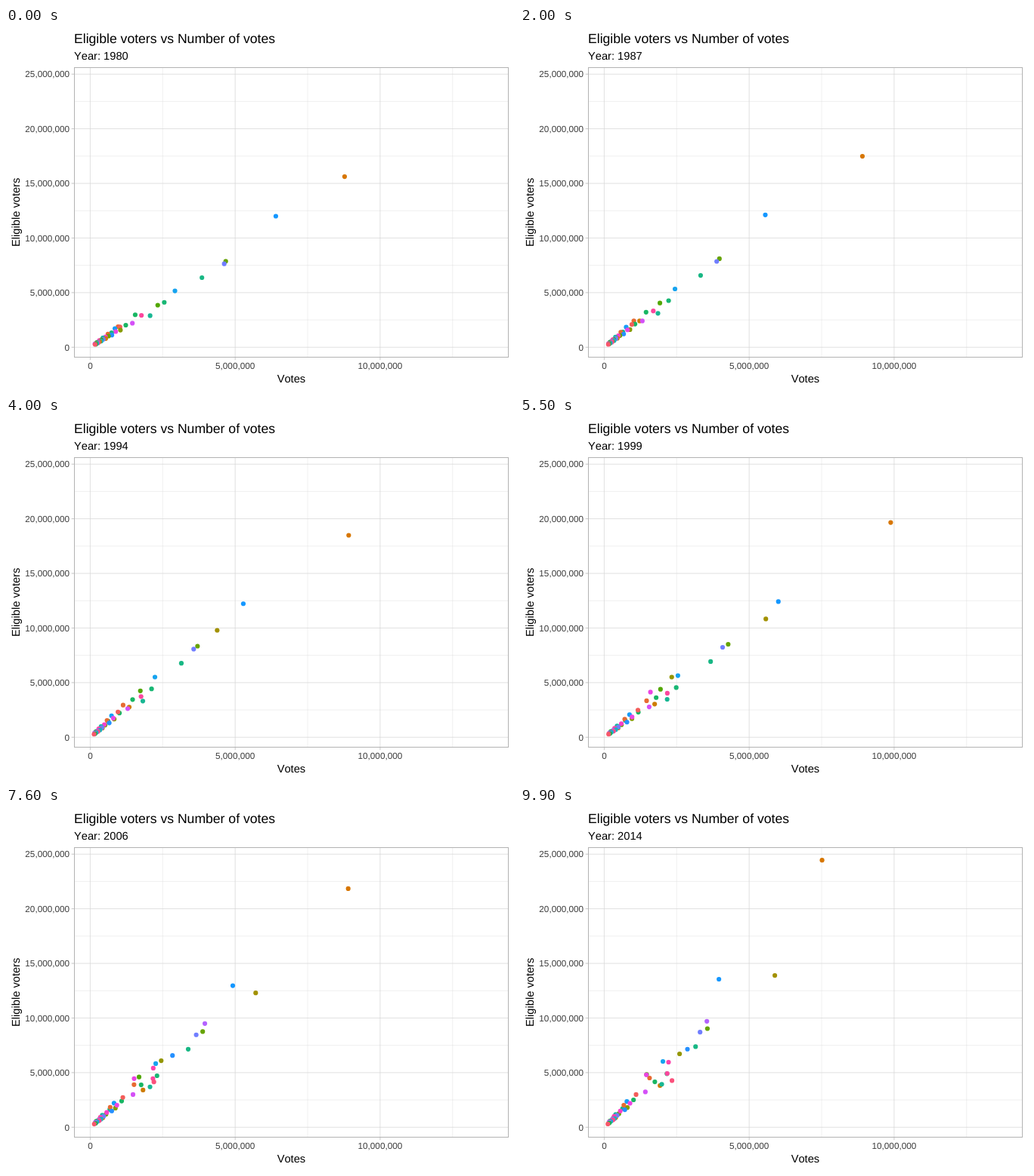
An HTML page that plays this animation: 672x480 px, repeating every 10000 ms.

```html
<!DOCTYPE html>
<html lang="en">
<head>
<meta charset="utf-8">
<title>Eligible voters vs Number of votes</title>
<style>
  html, body { margin: 0; width: 100%; height: 100%; overflow: hidden; background: #fff; }
  svg {
    display: block; font: 14.67px "Liberation Sans", Arial, sans-serif;
    font-kerning: none; text-rendering: geometricPrecision;
  }
  .title { font-size: 17.6px; }
  .tick { font-size: 11.73px; fill: #3c3c3c; }
  .mid { text-anchor: middle; }
  .end { text-anchor: end; }
  .major { stroke: #d6d6d6; stroke-width: .75; }
  .minor { stroke: #d6d6d6; stroke-width: .4; }
  .mark { stroke: #b3b3b3; stroke-width: .75; }
  .border { fill: none; stroke: #b3b3b3; stroke-width: 1; }
</style>
</head>
<body>
<svg width="672" height="480" viewBox="0 0 672 480">
  <text class="title" x="90" y="20">Eligible voters vs Number of votes</text>
  <text id="year" x="90" y="42"></text>
  <g id="axes"></g>
  <g id="dots"></g>
  <rect class="border" x="90.5" y="52.5" width="574" height="384"/>
  <text class="mid" x="377.4" y="470">Votes</text>
  <text class="mid" transform="translate(18 244.3) rotate(-90)">Eligible voters</text>
</svg>
<script>
const FRAMES = 100, LAST = FRAMES - 1, STEP = 100;
const xAt = millions => 111.4 + millions * 38.35;
const yAt = millions => 423.3 - millions * 14.484;

// Axes
const axes = document.getElementById("axes");
const add = markup => axes.insertAdjacentHTML("beforeend", markup);
const line = (cls, x1, y1, x2, y2) =>
  add(`<line class="${cls}" x1="${x1}" y1="${y1}" x2="${x2}" y2="${y2}"/>`);
const vertical = (cls, m) => line(cls, xAt(m), 52, xAt(m), 436.5);
const horizontal = (cls, m) => line(cls, 90.5, yAt(m), 664.5, yAt(m));
const label = m => (m * 1e6).toLocaleString("en-US");

for (let m = 2.5; m < 13; m += 5) vertical("minor", m);
for (let m = 2.5; m < 25; m += 5) horizontal("minor", m);
for (let m = 0; m <= 10; m += 5) {
  vertical("major", m);
  line("mark", xAt(m), 436.5, xAt(m), 440.2);
  add(`<text class="tick mid" x="${xAt(m)}" y="452">${label(m)}</text>`);
}
for (let m = 0; m <= 25; m += 5) {
  horizontal("major", m);
  line("mark", 86.7, yAt(m), 90.5, yAt(m));
  add(`<text class="tick end" x="84" y="${yAt(m) + 4.2}">${label(m)}</text>`);
}

// Evenly spaced hues of equal lightness (CIE LUV), shown with a 1.8 display gamma
function color(index) {
  const h = (15 + index * 360 / 51) * Math.PI / 180, L = 65, C = 100;
  const u = C * Math.cos(h) / (13 * L) + .1978, v = C * Math.sin(h) / (13 * L) + .4683;
  const Y = ((L + 16) / 116) ** 3;
  const X = Y * 9 * u / (4 * v), Z = Y * (12 - 3 * u - 20 * v) / (4 * v);
  const clamp = c => Math.min(1, Math.max(0, c));
  const r = clamp(3.2406 * X - 1.5372 * Y - .4986 * Z);
  const g = clamp(-.9689 * X + 1.8758 * Y + .0415 * Z);
  const b = clamp(.0557 * X - .204 * Y + 1.057 * Z);
  const shown = [.973 * r + .027 * g, 1.055 * g - .027 * r - .028 * b, b];
  return `rgb(${shown.map(c => Math.round(255 * clamp(c) ** (1 / 1.8)))})`;
}

// Value at frame t of key points spread evenly over the loop
function trend(points, t, ease = p => p, snap = k => k) {
  const key = j => snap(j * LAST / (points.length - 1));
  let j = 0;
  while (j < points.length - 2 && t >= key(j + 1)) j++;
  const p = (t - key(j)) / (key(j + 1) - key(j));
  return points[j] + (points[j + 1] - points[j]) * ease(p);
}
const quartic = p => p < .5 ? 8 * p ** 4 : 1 - 8 * (1 - p) ** 4;
const swing = (points, t) => trend(points, t, quartic, Math.round);

// One key point per election, every second year from 1980 to 2014
const turnout = [.55, .42, .552, .38, .528, .385, .58, .41, .52, .38, .55, .4, .605, .41, .62, .415, .585, .365];
const ballots = [8.775, 8.064, 9.796, 7.617, 10.195, 7.899, 11.375, 8.901, 10.263,
  8.621, 11.143, 7.739, 12.589, 8.899, 13.743, 10.54, 13.202, 7.514];

// Eligible voters in millions; rate is relative to the national turnout
const states = [];
function state(index, eligible, rate, since = 1980) {
  const votes = t => trend(eligible, t) * trend(rate, t) * swing(turnout, t);
  states.push({ index, eligible, votes, since });
}

states.push({
  index: 4, since: 1980,
  eligible: [15.62, 17.47, 18.46, 20, 22.2, 24.45],
  votes: t => swing(ballots, t)
});
state(2, [1.88, 4.51], [.93, .95]);
state(5, [2.05, 3.82], [1.05, 1.38], 1982);
state(9, [7, 13.9], [1.04, 1.16], 1990);
state(10, [4, 6.72], [.72, 1.06], 1996);
state(13, [7.87, 9.03], [1.08, 1.08]);
state(14, [3.85, 4.83], [1.1, .83]);
state(20, [2.97, 4.16], [.95, 1.15]);
state(21, [4.11, 4.9], [1.13, 1.21]);
state(22, [6.37, 7.38], [1.1, 1.17]);
state(23, [2.89, 3.94], [1.3, 1.38]);
state(30, [5.16, 6.03], [1.03, .92]);
state(32, [12, 12.28, 13.55], [.97, 1.07, .8]);
state(33, [4.65, 7.15], [.9, 1.1], 2006);
state(35, [7.64, 8.71], [1.1, 1.04]);
state(38, [8.8, 9.7], [1.07, 1], 2006);
state(42, [3.3, 4.8], [.83, .83], 1996);
state(46, [3.6, 5.96], [.85, 1.02], 2002);
state(47, [2.92, 4.92], [1.1, 1.21]);
state(49, [3.75, 4.27], [.6, 1.5], 2006);

// Small states: sizes shrink geometrically, growth and turnout are scattered
const scatter = (i, step, low, high) => low + (high - low) * (i * step % 1);
for (let i = 0; i < 26; i++) {
  const size = 2.2 * Math.exp(-.085 * i);
  const rate = scatter(i + 1, .755, .9, 1.3);
  state((40 + 31 * i) % 51, [size, size * scatter(i + 1, .618, 1.1, 1.7)], [rate, rate]);
}

const dots = document.getElementById("dots");
dots.innerHTML = states.map(s => `<circle r="3.08" fill="${color(s.index)}"/>`).join("");

function draw(t) {
  const year = 1980 + 34 * t / LAST;
  document.getElementById("year").textContent = "Year: " + Math.round(year);
  states.forEach((s, i) => {
    const dot = dots.children[i];
    dot.setAttribute("visibility", year < s.since ? "hidden" : "visible");
    dot.setAttribute("cx", xAt(s.votes(t)));
    dot.setAttribute("cy", yAt(trend(s.eligible, t)));
  });
}

const start = performance.now();
function tick() {
  draw(Math.floor((performance.now() - start) / STEP) % FRAMES);
  requestAnimationFrame(tick);
}
tick();
</script>
</body>
</html>
```
